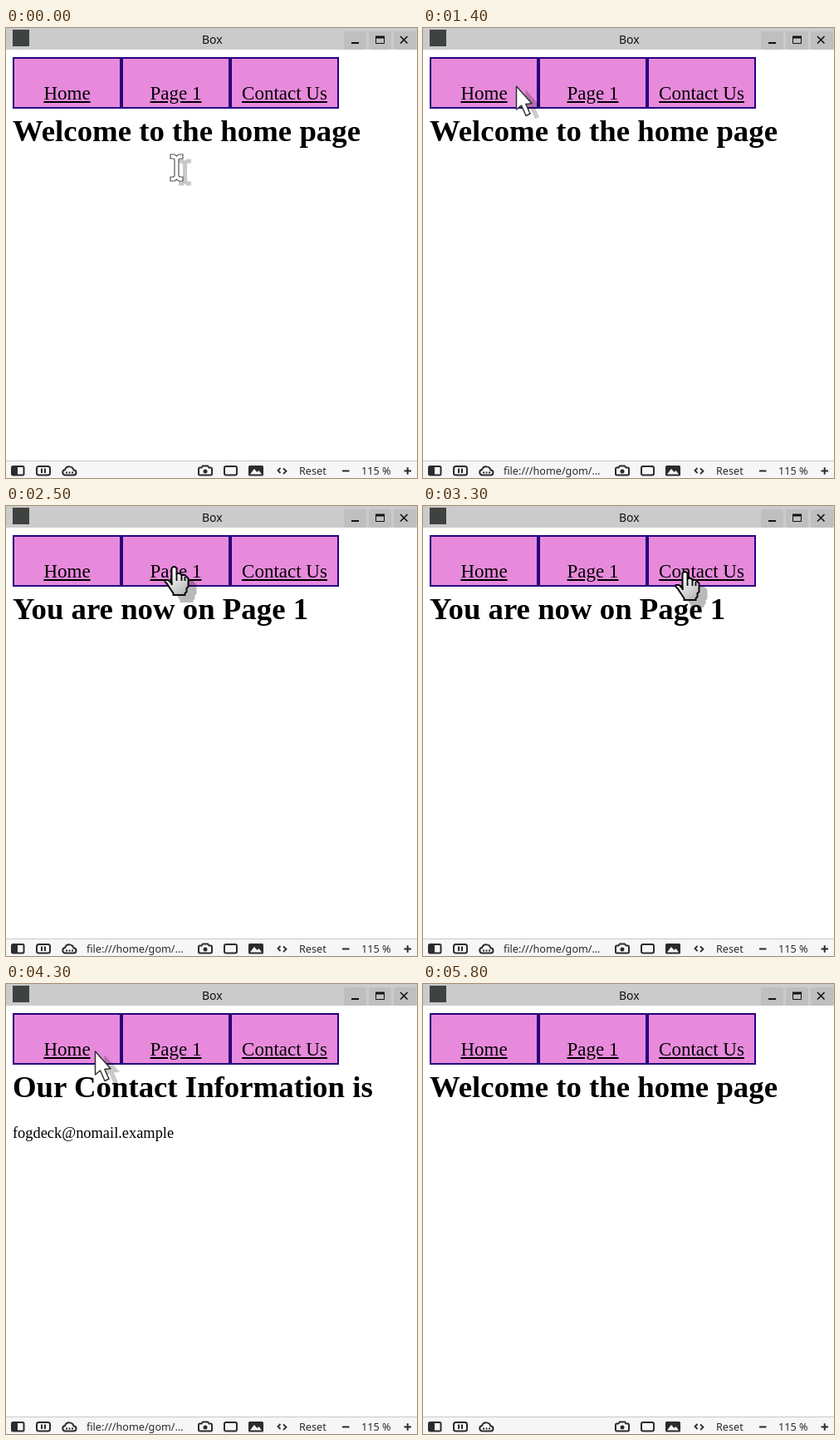
An HTML page for the animation above (6.5 s loop, 495 by 541 pixels).

```html
<!DOCTYPE html>
<html lang="en">
<head>
<meta charset="utf-8">
<title>Box</title>
<style>
  html, body { margin: 0; width: 100%; height: 100%; overflow: hidden; background: #fff; }
  #stage { position: relative; width: 495px; height: 541px; overflow: hidden; background: #fff; }
  #stage > * { position: absolute; }
  .bar { left: 0; width: 495px; }
  .title { top: 0; height: 26px; background: #cbcbcb; }
  .status { top: 520px; height: 21px; background: #f6f6f6; border-top: 1px solid #c9c9c9; box-sizing: border-box; }
  .ui { font: 12.65px/18px "Noto Sans", "Open Sans", sans-serif; color: #2b2b2b; white-space: pre; top: 523px; }
  #name { font-size: 14px; line-height: 19px; left: 236px; top: 4px; color: #111; }
  nav { left: 8px; top: 35px; display: flex; }
  nav div {
    box-sizing: border-box; width: 131px; height: 62px; padding-top: 29px;
    border: 2px solid #26007d; background: #e88adc; text-align: center;
  }
  nav a { color: #000; text-decoration: underline; }
  nav, h1, p { font-family: "Liberation Serif", "Times New Roman", serif; color: #000; white-space: nowrap; }
  nav { font-size: 23px; line-height: 25px; }
  h1 { margin: 0; left: 8px; top: 103px; font-size: 36.8px; line-height: 41px; }
  p { margin: 0; left: 8px; top: 169px; font-size: 18.4px; line-height: 20px; }
  svg { left: 0; top: 0; }
  #pointer g { visibility: hidden; }
  #pointer .on, #pointer .on g { visibility: visible; }
</style>
</head>
<body>
<div id="stage">
  <div class="bar title"></div>
  <div class="bar status"></div>
  <span class="ui" id="name">Box</span>
  <nav>
    <div><a>Home</a></div>
    <div><a>Page 1</a></div>
    <div><a>Contact Us</a></div>
  </nav>
  <h1 id="heading">Welcome to the home page</h1>
  <p id="mail">fogdeck@nomail.example</p>
  <span class="ui" id="link" style="left:97px">file:///home/gom/…</span>
  <span class="ui" style="left:353px">Reset</span>
  <span class="ui" style="left:428px">115 %</span>

  <svg width="495" height="541" fill="none" stroke="#2b2b2b" stroke-width="2">
    <rect x="8" y="2" width="20" height="20" fill="#3f4340" stroke="none"/>
    <!-- window buttons -->
    <g fill="#bfbfbf" stroke="none">
      <rect x="407" y="4" width="27" height="22" rx="3"/>
      <rect x="437" y="4" width="27" height="22" rx="3"/>
      <rect x="467" y="4" width="27" height="22" rx="3"/>
    </g>
    <g stroke="#111">
      <path d="M416 18H425"/>
      <path d="M445.5 10V18.5H455.5V10" stroke-width="1"/>
      <path d="M445 11H456" stroke-width="3"/>
      <path d="M475 10L483.500 18.500M483.500 10L475 18.500" stroke-width="1.6"/>
    </g>
    <!-- status bar icons -->
    <rect x="7" y="527" width="14.500" height="10.500" rx="1.500"/>
    <rect x="7" y="527" width="7" height="10.500" fill="#2b2b2b" stroke="none"/>
    <rect x="37" y="527" width="16" height="10.500" rx="2.500"/>
    <path d="M43 529.500V535M47 529.500V535"/>
    <path d="M71 537.500H81.500A3 3 0 0 0 81.500 531.500A5.500 5.500 0 0 0 71 531A3.300 3.300 0 0 0 71 537.500Z"/>
    <path d="M72 534.500H81" stroke-dasharray="2 1.500"/>
    <path d="M233 528.500H235.500L237 526.500H243L244.500 528.500H247Q248 528.500 248 530V536Q248 537.500 246.500 537.500H233.500Q232 537.500 232 536V530Q232 528.500 233 528.500Z"/>
    <circle cx="240" cy="533" r="2.500" fill="#2b2b2b" stroke="none"/>
    <rect x="263" y="527" width="15" height="10.500" rx="2"/>
    <rect x="292" y="526" width="18" height="12.500" rx="1.500" fill="#2b2b2b" stroke="none"/>
    <path d="M294 536.500L299 530L302.500 534L304.500 532L308 536.500Z" fill="#f6f6f6" stroke="none"/>
    <path d="M330.500 529L327.500 532L330.500 535M334 529.500L337.500 532.800L334 536" stroke-width="1.800"/>
    <path d="M405 532.500H413.500M479.500 532.500H488M483.700 528.300V536.800"/>
  </svg>

  <svg id="pointer" width="495" height="541">
    <defs>
      <linearGradient id="skin" x1="0" y1="0" x2=".6" y2="1">
        <stop offset=".25" stop-color="#fff"/>
        <stop offset="1" stop-color="#bdbdbd"/>
      </linearGradient>
      <filter id="soft" x="-20%" y="-20%" width="140%" height="140%">
        <feGaussianBlur stdDeviation=".7"/>
      </filter>
      <path id="beamShape" d="M1 1H6L8.500 3L11 1H16V6H13Q11 6 11 8V26Q11 28 13 28H16V33H11L8.500 31L6 33H1V28H4Q6 28 6 26V8Q6 6 4 6H1Z"/>
      <path id="arrowShape" d="M.5 1V29L6.500 24L12 36.500L17 34L11.800 22.500L19 21.800Z"/>
      <path id="handShape" d="M4 10V1L5 0H6L7 1V4H9L10 5H12L14 7V12L13 13V15L12 16V17H5V16L3 13L1 10L0 9V8H2Z"/>
    </defs>
    <g id="beam">
      <use href="#beamShape" x="10" y="5.500" fill="#000" opacity=".21" filter="url(#soft)"/>
      <use href="#beamShape" fill="#fff" stroke="#555" stroke-width="1.200"/>
    </g>
    <g id="arrow">
      <use href="#arrowShape" x="11" y="4" fill="#000" opacity=".2" filter="url(#soft)"/>
      <use href="#arrowShape" fill="#fff" stroke="#333" stroke-width="1.500" stroke-linejoin="round"/>
    </g>
    <g id="hand">
      <g transform="translate(-11.500 1) scale(2)">
        <use href="#handShape" x="4.500" y="4" fill="#000" stroke="#000" opacity=".27"/>
        <use href="#handShape" fill="url(#skin)" stroke="#0a0a0a"/>
        <path d="M7 4V8.500M10 5V8.500M12 6V8.500M4 9V11" fill="none" stroke="#0a0a0a" stroke-width=".9"/>
      </g>
    </g>
  </svg>
</div>

<script>
  // All times are in ticks of 100 ms.
  const LOOP = 6500, TICK = 100;
  const $ = id => document.getElementById(id);

  const moves = [
    [0, "beam", 197, 151], [1, "beam", 157, 107],
    [3, "arrow", 138, 98], [4, "arrow", 112, 90],
    [5, "hand", 90, 80], [6, "hand", 74, 72], [7, "hand", 69, 71],
    [14, "arrow", 112, 69], [15, "arrow", 150, 69],
    [17, "hand", 190, 70], [18, "hand", 203, 72],
    [28, "arrow", 244, 70], [29, "hand", 270, 74],
    [31, "hand", 285, 75], [32, "hand", 303, 76], [33, "hand", 316, 78],
    [40, "hand", 300, 75], [41, "arrow", 247, 72], [43, "arrow", 107, 80],
    [44, "hand", 98, 83], [45, "hand", 90, 82], [46, "hand", 84, 80], [47, "hand", 81, 77],
    [54, "arrow", 78, 64], [55, "arrow", 70, 50], [57, "arrow", 41, 17], [58, ""]
  ];
  const pages = [
    [0, "Welcome to the home page"],
    [23, "You are now on Page 1"],
    [38, "Our Contact Information is"],
    [52, "Welcome to the home page"]
  ];
  // The link preview flips at each of these ticks, starting hidden.
  const flips = [5, 15, 17, 24, 25, 28, 29, 39, 40, 53];

  const latest = (list, tick) => list.filter(row => row[0] <= tick).pop();
  const show = (el, on) => { el.style.visibility = on ? "visible" : "hidden"; };

  function draw(tick) {
    const [, kind, x, y] = latest(moves, tick);
    for (const id of ["beam", "arrow", "hand"]) {
      const el = $(id);
      el.classList.toggle("on", id === kind);
      if (id === kind) el.setAttribute("transform", `translate(${x} ${y})`);
    }
    const text = latest(pages, tick)[1];
    $("heading").textContent = text;
    show($("mail"), text.startsWith("Our"));
    show($("link"), flips.filter(t => t <= tick).length % 2);
  }

  const start = performance.now();
  let last = 0;
  function loop() {
    const tick = Math.floor((performance.now() - start) % LOOP / TICK);
    if (tick !== last) draw(last = tick);
    requestAnimationFrame(loop);
  }
  draw(0);
  loop();
</script>
</body>
</html>
```
